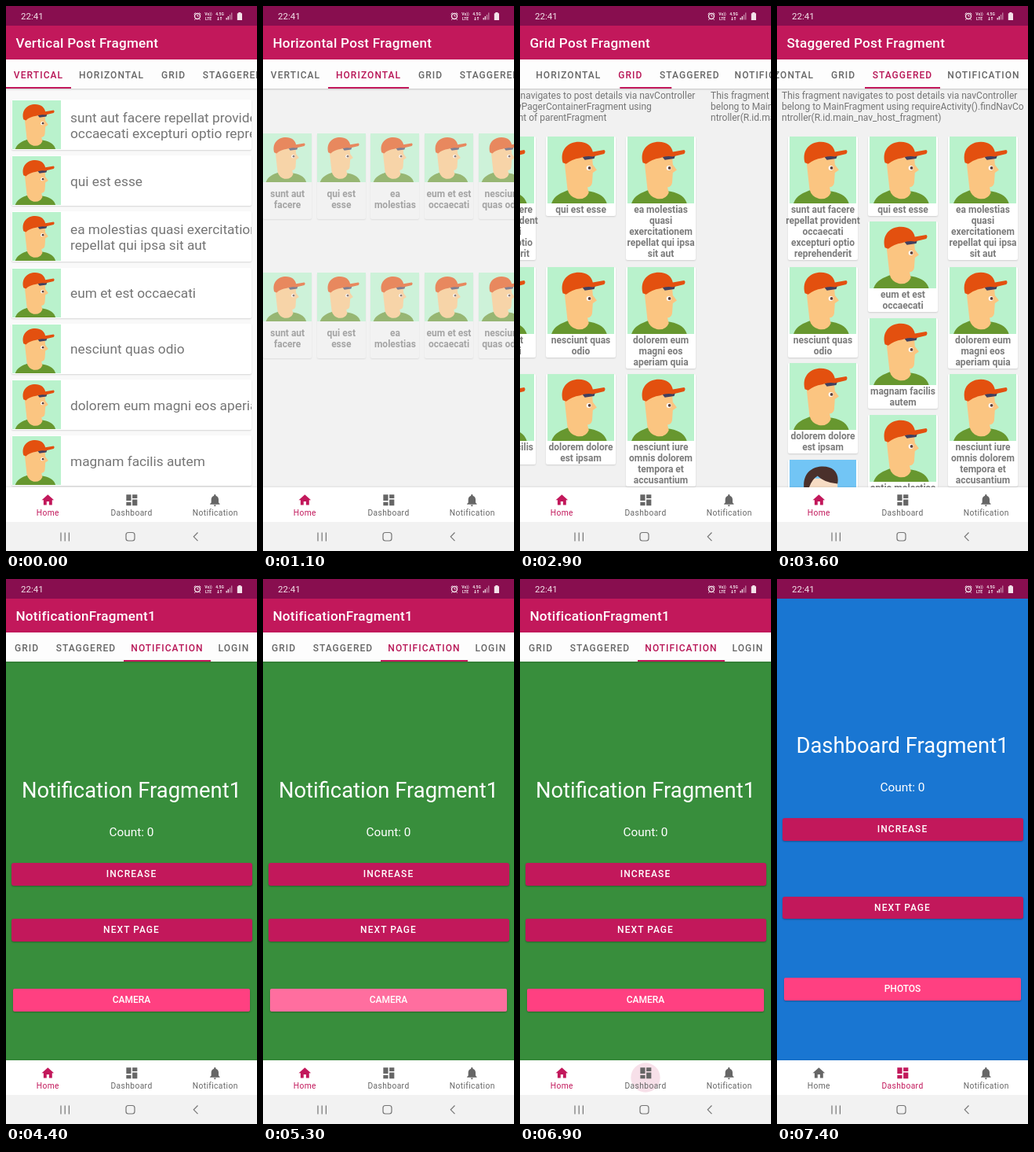
Recreate the animation shown at these times as an HTML page. Size 320 by 693 pixels, loop 8000 ms.

```html
<!DOCTYPE html>
<html lang="en">
<head>
<meta charset="utf-8">
<title>Navigation demo</title>
<style>
html, body { margin: 0; width: 100%; height: 100%; overflow: hidden; background: #f2f2f2; }
#stage { position: absolute; left: 0; top: 0; width: 320px; height: 693px; overflow: hidden;
  background: #f2f2f2; font-family: Roboto, "Noto Sans", sans-serif; }
#stage div, #stage svg { position: absolute; }
#stage div { white-space: pre; }
.mid { text-align: center; }
.cap { font-size: 12px; font-weight: 500; letter-spacing: 1.07px; }
.card { background: #fff; border-radius: 2px; box-shadow: 0 1px 2px rgba(0,0,0,.14); }
.name { font-size: 12px; line-height: 14px; font-weight: 700; color: #7b7b7b; text-align: center; }
.note { font-size: 12px; line-height: 14px; color: #757575; }
.btn { color: #fff; text-align: center; border-radius: 3px; }
.fill { background: #c2185b; box-shadow: 0 1px 2px rgba(0,0,0,.3); }
.pink { background: #ff4081; letter-spacing: 0; border-radius: 2px; box-shadow: 0 1px 2px rgba(0,0,0,.3); }
.line { border: 1px solid #fff; box-sizing: border-box; }
</style>
</head>
<body>
<svg width="0" height="0" style="position:absolute">
  <symbol id="redcap" viewBox="0 0 100 100">
    <path fill="#b9f2cc" d="M0 0h100v100H0z"/>
    <path fill="#67972f" d="M6 100C10 88 20 84 34 79L64 82C80 85 86 91 89 100z"/>
    <path fill="#fbc581" d="M25 34L67 29L68 42L74 50L68 54L67 69Q66 75 60 76L62 84Q57 95 44 93Q33 90 30 79z"/>
    <path fill="#3f4060" d="M52 30L72 27L70 33L56 35z"/>
    <path fill="#e3500f" d="M23 39C18 20 31 8 47 8C59 8 66 14 68 23L85 20Q88 22 85 26L68 30Q59 28 49 32Q36 34 28 41z"/>
    <circle cx="62" cy="47" r="3.6" fill="#fff"/>
    <circle cx="63" cy="47" r="2.2" fill="#5d4037"/>
  </symbol>
  <symbol id="dark" viewBox="0 0 100 100">
    <path fill="#72c5f5" d="M0 0h100v100H0z"/>
    <path fill="#f7dcc4" d="M28 28h44v30q-6 22-22 22t-22-22z"/>
    <path fill="#4a302b" d="M22 46C18 20 34 10 50 10C66 10 75 20 72 36Q52 34 42 24Q32 30 28 46z"/>
  </symbol>
</svg>
<div id="stage"></div>
<script>
const stage = document.getElementById('stage');

function box(parent, x, y, w, h, cls = '', css = '', html = '') {
  const d = document.createElement('div');
  d.className = cls;
  d.style.cssText = `left:${x}px;top:${y}px;width:${w}px;height:${h}px;${css}`;
  d.innerHTML = html;
  parent.append(d);
  return d;
}
// One line of text, centred vertically on y
const text = (p, x, y, w, size, str, cls = '', css = '') =>
  box(p, x, y - 20, w, 40, cls, `font-size:${size}px;line-height:40px;${css}`, str);
const picture = (p, x, y, size, id = 'redcap') =>
  box(p, x, y, size, size, '', '', `<svg width="${size}" height="${size}"><use href="#${id}"/></svg>`);
const button = (p, x, y, w, kind, str) =>
  box(p, x, y, w, 28.6, 'btn cap ' + kind, `line-height:${kind === 'line' ? 28 : 29}px`, str);
const icon = (path, size = 18.7) =>
  `<svg width="${size}" height="${size}" viewBox="0 0 24 24" fill="currentColor"><path d="${path}"/></svg>`;

// Pages
const pager = box(stage, 0, 105.4, 320, 506.6, '', 'overflow:hidden');
const pages = ['#f9f9f9', '#f2f2f2', '#f1f1f1', '#f1f1f1', '#388e3c'].map(bg => {
  const clip = box(pager, 0, 0, 320, 507, '', `background:${bg};overflow:hidden`);
  return { clip, body: box(clip, 0, -105.4, 320, 612) };
});
const layer = i => box(pages[i].body, 0, 0, 320, 612);

const rows = [
  'sunt aut facere repellat provident\noccaecati excepturi optio reprehenderit',
  'qui est esse',
  'ea molestias quasi exercitationem\nrepellat qui ipsa sit aut',
  'eum et est occaecati', 'nesciunt quas odio',
  'dolorem eum magni eos aperiam quia', 'magnam facilis autem'
];
rows.forEach((str, i) => {
  const card = box(pages[0].body, 7, 119 + i * 71.2, 306, 64, 'card', 'overflow:hidden');
  picture(card, 1, 1, 62);
  const n = str.split('\n').length;
  box(card, 75, 32.5 - n * 10, 400, n * 20, '', 'font-size:17.3px;line-height:20px;color:#757575', str);
});

const strip = layer(1);
const strips = ['sunt aut\nfacere', 'qui est\nesse', 'ea\nmolestias', 'eum et est\noccaecati', 'nesciunt\nquas odio'];
for (const y of [162, 339]) strips.forEach((str, i) => {
  const card = box(strip, .2 + i * 68.6, y, 62, 109, 'card', 'background:#f2f2f2');
  picture(card, 0, 0, 62);
  box(card, -10, 70, 82, 28, 'name', '', str);
});

const tiles = [
  'sunt aut facere\nrepellat provident\noccaecati\nexcepturi optio\nreprehenderit',
  'qui est esse',
  'ea molestias\nquasi\nexercitationem\nrepellat qui ipsa\nsit aut',
  'eum et est\noccaecati', 'nesciunt quas\nodio', 'dolorem eum\nmagni eos\naperiam quia',
  'magnam facilis\nautem', 'dolorem dolore\nest ipsam',
  'nesciunt iure\nomnis dolorem\ntempora et\naccusantium',
  'optio molestias\nid quia eum', 'et ea vero quia\nlaudantium autem'
];
const lines = str => str.split('\n').length;
const pitch = n => 94 + n * 14.3;

function tile(p, col, y, i) {
  const card = box(p, 14 + col * 102, y, 89, 87 + 14 * lines(tiles[i]), 'card');
  picture(card, 2, 0, 85, i > 9 ? 'dark' : 'redcap');
  box(card, -12, 86, 113, 14, 'name', '', tiles[i]);
}

box(pages[2].body, 6, 107, 314, 42, 'note', '',
  'This fragment navigates to post details via navController\nbelong to ViewPagerContainerFragment using\nparentFragment of parentFragment');
const grid = layer(2);
for (let r = 0, y = 166; r < 3; r++) {
  const ids = [0, 1, 2].map(c => r * 3 + c);
  ids.forEach((i, c) => tile(grid, c, y, i));
  y += pitch(Math.max(...ids.map(i => lines(tiles[i]))));
}

box(pages[3].body, 6, 107, 314, 42, 'note', '',
  'This fragment navigates to post details via navController\nbelong to MainFragment using requireActivity().findNavCo\nntroller(R.id.main_nav_host_fragment)');
const stagger = layer(3);
const tops = [166, 166, 166];
tiles.forEach((str, i) => {
  const col = tops.indexOf(Math.min(...tops));
  tile(stagger, col, tops[col], i);
  tops[col] += pitch(lines(str));
});

function counterPage(p, title, ys, last) {
  text(p, 0, ys[0], 320, 27.4, title, 'mid', 'color:#fff');
  text(p, 0, ys[0] + 53, 320, 15.4, 'Count: 0', 'mid', 'color:#fff');
  button(p, 6.5, ys[1], 307, 'fill', 'INCREASE');
  button(p, 6.5, ys[2], 307, 'fill', 'NEXT PAGE');
  return button(p, 9, ys[3], 302, 'pink', last);
}
const cameraBtn = counterPage(pages[4].body, 'Notification Fragment1', [268.5, 361, 432, 521], 'CAMERA');

const camera = box(stage, 0, 105.4, 320, 507, '', 'background:#d32f2f');
['Dynamic Feature', ' Camera Fragment1', ' Count: 0'].forEach((str, i) =>
  text(camera, 0, 223 + i * 32, 320, 27.4, str, 'mid', 'color:#fff'));
button(camera, 6, 387.6, 308, 'line', 'NEXT PAGE');

// App bar and tabs
const bar = box(stage, 0, 25, 320, 43.4, '', 'background:#c2185b;color:#fff');
const back = box(bar, 12, 12.3, 19, 19, '', '', icon('M20 11H7.83l5.59-5.59L12 4l-8 8 8 8 1.41-1.41L7.83 13H20v-2z'));
const title = text(bar, 12.45, 22, 300, 17.1, '', '', 'font-weight:500;letter-spacing:.28px');
const titles = ['Vertical Post Fragment', 'Horizontal Post Fragment', 'Grid Post Fragment',
  'Staggered Post Fragment', 'NotificationFragment1'];

const tabBar = box(stage, 0, 68.4, 320, 37, '', 'background:#fdfdfd;overflow:hidden;box-shadow:0 1px 2px rgba(0,0,0,.2)');
const tabRow = box(tabBar, 0, 0, 507, 37);
const edges = [0, 83, 186, 241, 337, 448, 507];
const scrolls = [0, 0, 53, 129, 187];
const tabs = ['VERTICAL', 'HORIZONTAL', 'GRID', 'STAGGERED', 'NOTIFICATION', 'LOGIN'].map((str, i) =>
  text(tabRow, edges[i], 19.6, edges[i + 1] - edges[i], 12, str, 'mid cap'));
const marker = box(tabRow, 0, 34.9, 83, 1.7, '', 'background:#c2185b');

const dash = box(stage, 0, 25, 320, 587, '', 'background:#1976d2');
counterPage(dash, 'Dashboard Fragment1', [187, 279, 378.5, 482], 'PHOTOS');

// Status bar
box(stage, 0, 0, 320, 25, '', 'background:#880e4f');
text(stage, 19, 13, 60, 11.5, '22:41', '', 'color:#f3e3ea');
box(stage, 0, 0, 320, 25, '', '', `<svg width="320" height="25" fill="#f3e3ea" font-weight="700" font-size="5" text-anchor="middle">
  <g fill="none" stroke="#f3e3ea"><circle cx="244" cy="13" r="3.5" stroke-width="1.4"/>
  <path d="M244 11v2h1.6M239.6 10.4l2-2M248.4 10.4l-2-2M241.4 16.4l-1 1.4M246.6 16.4l1 1.4"/>
  <path stroke-width=".9" d="M270.5 14v4M269.3 16.8l1.2 1.2 1.2-1.2M274 18v-4M272.8 15.2l1.2-1.2 1.2 1.2"/></g>
  <text x="258" y="12.4">Vo))</text><text x="258" y="17.8">LTE</text><text x="272.5" y="12.4">4.5G</text>
  <path d="M280.5 15h1.3v2.5h-1.3zM282.7 13h1.3v4.5h-1.3z"/><path opacity=".55" d="M284.9 11h1.3v6.5h-1.3zM287.1 8.5h1.3v9h-1.3z"/>
  <path d="M296.3 8h3.2v1.2h1.5v8.8h-6.2V9.2h1.5z"/></svg>`);

// Bottom navigation
const nav = box(stage, 0, 612, 320, 44, '', 'background:#fff;overflow:hidden;box-shadow:0 -1px 2px rgba(0,0,0,.08)');
const ripple = box(nav, 120, -18, 80, 80, '', 'background:#c2185b;border-radius:50%');
const items = [
  ['Home', 'M10 20v-6h4v6h5v-8h3L12 3 2 12h3v8z'],
  ['Dashboard', 'M3 13h8V3H3v10zm0 8h8v-6H3v6zm10 0h8V11h-8v10zm0-18v6h8V3h-8z'],
  ['Notification', 'M12 22c1.1 0 2-.9 2-2h-4c0 1.1.89 2 2 2zm6-6v-5c0-3.07-1.64-5.64-4.5-6.32V4c0-.83-.67-1.5-1.5-1.5s-1.5.67-1.5 1.5v.68C7.63 5.36 6 7.92 6 11v5l-2 2v1h16v-1l-2-2z']
].map(([str, path], i) => {
  const item = box(nav, i * 106.7, 0, 106.7, 44);
  box(item, 44, 6.5, 19, 19, '', '', icon(path));
  text(item, 0, 32.5, 106.7, 10.27, str, 'mid', 'letter-spacing:.38px');
  return item;
});
box(stage, 0, 656, 320, 37, '', 'background:#f2f2f2', `<svg width="320" height="37" fill="none" stroke="#757575" stroke-width="1.2">
  <path d="M70 13.5v11M75.2 13.5v11M80.4 13.5v11M244.5 13.5l-5.2 5.3 5.2 5.3"/><rect x="153" y="13.5" width="11" height="10.5" rx="3"/></svg>`);

// Timeline: [ms, value], eased between neighbours
const swipe = [[400, 0], [1000, 1], [1300, 1], [2100, 2], [2700, 2], [3300, 3], [3900, 3], [4400, 4]];
const fades = [[strip, [[950, 0], [1200, 1]]], [grid, [[2200, 0], [2400, 1]]], [stagger, [[3200, 0], [3500, 1]]]];

function at(keys, t) {
  if (t <= keys[0][0]) return keys[0][1];
  for (let i = 1; i < keys.length; i++) {
    const [a, u] = keys[i - 1], [b, v] = keys[i];
    if (t < b) {
      const s = (t - a) / (b - a);
      return u + (v - u) * s * s * (3 - 2 * s);
    }
  }
  return keys[keys.length - 1][1];
}
const lerp = (list, p) => {
  const i = Math.floor(p), next = list[i + 1] ?? list[i];
  return list[i] + (next - list[i]) * (p - i);
};
const show = (el, on) => { el.style.visibility = on ? 'visible' : 'hidden'; };

function render(t) {
  const pos = at(swipe, t);
  pages.forEach(({ clip }, i) => {
    clip.style.transform = `translateX(${(i - pos) * 320}px)`;
  });
  for (const [el, keys] of fades) el.style.opacity = at(keys, t);

  const left = lerp(edges, pos);
  tabRow.style.transform = `translateX(${-lerp(scrolls, pos)}px)`;
  marker.style.left = left + 'px';
  marker.style.width = lerp(edges.slice(1), pos) - left + 'px';
  tabs.forEach((tab, i) => { tab.style.color = i === Math.round(pos) ? '#b81556' : '#666'; });

  const onCamera = t >= 5400 && t < 6200;
  show(camera, onCamera);
  show(back, onCamera);
  title.textContent = onCamera ? 'CameraFragment1' : titles[Math.floor(pos + .1)];
  title.style.left = (onCamera ? 56 : 12.45) + 'px';
  cameraBtn.style.backgroundColor = t >= 5300 && t < 5400 ? '#ff6e9f' : '#ff4081';

  const onDash = t >= 7000;
  show(dash, onDash);
  items.forEach((item, i) => { item.style.color = i === +onDash ? '#c2185b' : '#666'; });
  const press = (t - 6800) / 600;
  ripple.style.opacity = press > 0 && press < 1 ? .16 * (1 - press) : 0;
  ripple.style.transform = `scale(${Math.min(1, .3 + Math.max(0, press))})`;
}

const start = performance.now();
function tick() {
  const t = (performance.now() - start) % 8000;
  render(Math.floor(t / 100) * 100);
  requestAnimationFrame(tick);
}
tick();
</script>
</body>
</html>
```
